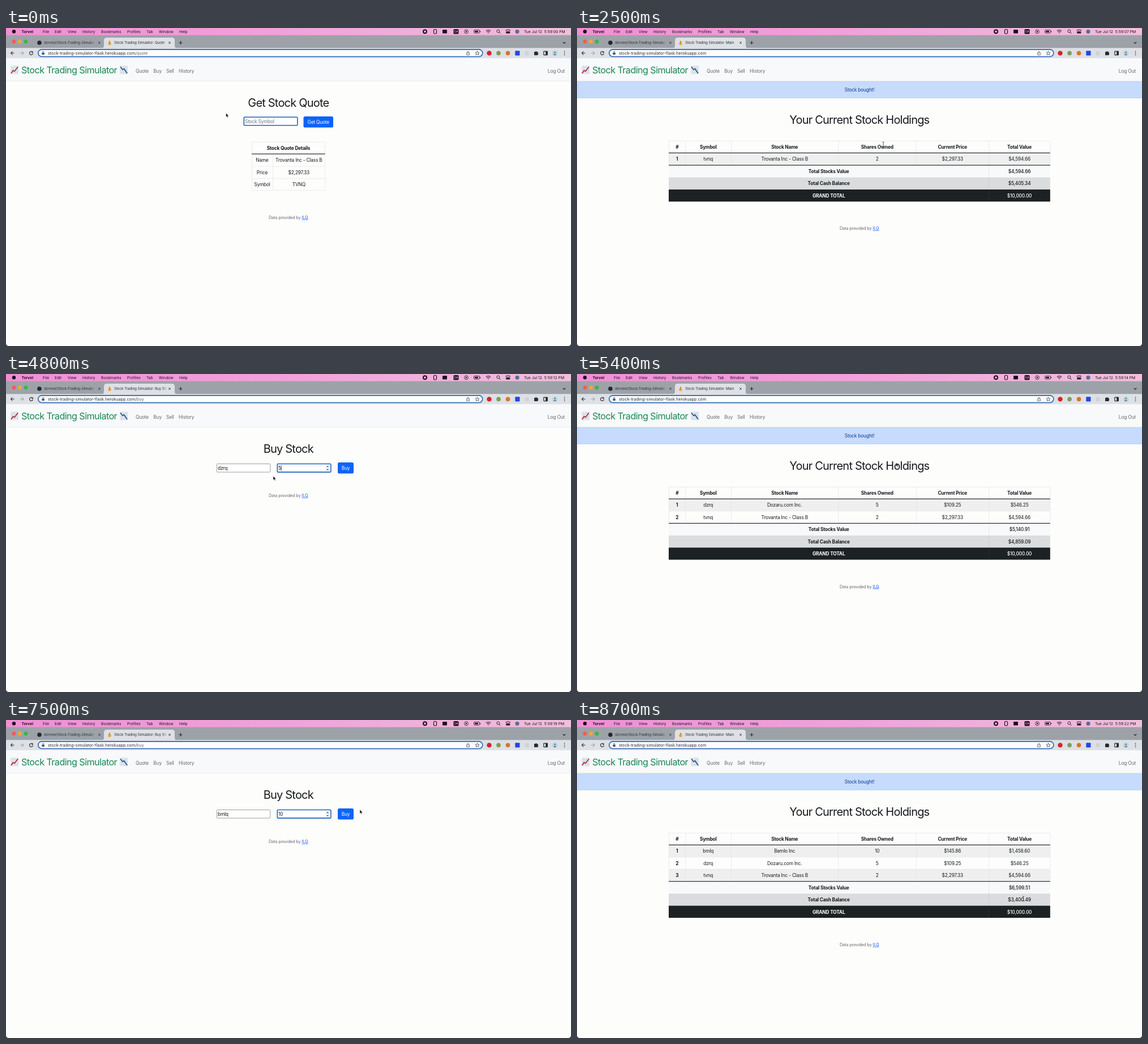
An HTML page with a canvas for the animation above (8800 ms loop, 998 by 561 pixels).

```html
<!DOCTYPE html>
<html lang="en">
<head>
<meta charset="utf-8">
<title>Stock Trading Simulator</title>
<style>
  html, body { margin: 0; width: 100%; height: 100%; overflow: hidden; background: #fdfdfc; }
  canvas { display: block; width: 998px; height: 561px; }
</style>
</head>
<body>
<canvas id="stage" width="998" height="561"></canvas>
<script>
const ctx = document.getElementById('stage').getContext('2d');
const LOOP = 8800, STEP = 100;
const INK = '#16191c', LINE = '#dee2e6', BLUE = '#0d63fa', GREY = '#66696c';
const HOST = 'stock-trading-simulator-flask.herokuapp.com';

const STOCKS = {
  tvnq: { name: 'Trovanta Inc - Class B', shares: 2, price: 2297.33 },
  dzrq: { name: 'Dozaru.com Inc.', shares: 5, price: 109.25 },
  bmlq: { name: 'Bemlo Inc', shares: 10, price: 145.86 }
};

// hover and click: when the Buy link is pointed at and pressed
const SCENES = [
  { at: 0, page: 'quote', hover: 400, click: 600 },
  { at: 700, page: 'buy', symbol: 'tvnq', symbolAt: 900, sharesAt: 1500 },
  { at: 2200, page: 'main', held: ['tvnq'] },
  { at: 3200, page: 'buy', symbol: 'dzrq', symbolAt: 3700, sharesAt: 4500 },
  { at: 5300, page: 'main', held: ['dzrq', 'tvnq'], hover: 5900, click: 6000 },
  { at: 6200, page: 'buy', symbol: 'bmlq', symbolAt: 6500, sharesAt: 7100 },
  { at: 8200, page: 'main', held: ['bmlq', 'dzrq', 'tvnq'] }
];

// time, x, y, pointer shape from that time on
const POINTER = [
  [0, 388.5, 150, 'arrow'], [200, 350, 125, 'arrow'], [400, 264, 78, 'hand'],
  [900, 264, 78, 'none'], [1700, 470, 190, 'arrow'], [1900, 598, 165, 'hand'],
  [2200, 598, 168, 'arrow'], [2400, 541, 205, 'text'], [2600, 541, 205, 'arrow'],
  [3000, 264, 78, 'hand'], [3300, 264, 78, 'arrow'], [3500, 420, 166, 'text'],
  [3700, 420, 166, 'none'], [4600, 440, 190, 'arrow'], [4800, 472, 180, 'arrow'],
  [5000, 598, 165, 'hand'], [5300, 598, 165, 'arrow'], [5800, 264, 78, 'hand'],
  [6300, 264, 78, 'arrow'], [6500, 400, 185, 'none'], [7100, 650, 197, 'arrow'],
  [7500, 625, 158, 'arrow'], [7700, 600, 165, 'hand'], [8000, 640, 205, 'arrow'],
  [8300, 730, 285, 'text'], [8600, 788.5, 315, 'text']
];

function text(str, x, y, { size = 8.3, color = INK, weight = 400, align = 'left', track = -0.02 } = {}) {
  ctx.font = `${weight} ${size}px Inter, sans-serif`;
  ctx.letterSpacing = `${track * size}px`;
  ctx.textAlign = align;
  ctx.fillStyle = color;
  ctx.fillText(str, x, y);
}
const centered = (str, x, y, style) => text(str, x, y, { ...style, align: 'center' });

function rect(x, y, w, h, color) {
  ctx.fillStyle = color;
  ctx.fillRect(x, y, w, h);
}

function round(x, y, w, h, r, fill, stroke, width = 1) {
  ctx.beginPath();
  ctx.roundRect(x, y, w, h, r);
  paint(fill, stroke, width);
}

function paint(fill, stroke, width = 1) {
  if (fill) { ctx.fillStyle = fill; ctx.fill(); }
  if (stroke) { ctx.strokeStyle = stroke; ctx.lineWidth = width; ctx.stroke(); }
}

function circle(x, y, r, fill, stroke, width) {
  ctx.beginPath();
  ctx.arc(x, y, r, 0, 7);
  paint(fill, stroke, width);
}

function path(d, x, y, fill, stroke, width) {
  const shape = new Path2D(d);
  ctx.save();
  ctx.translate(x, y);
  if (fill) { ctx.fillStyle = fill; ctx.fill(shape); }
  if (stroke) { ctx.strokeStyle = stroke; ctx.lineWidth = width || 1; ctx.stroke(shape); }
  ctx.restore();
}

function fadedText(str, x, y, right, style) {
  const fade = ctx.createLinearGradient(right - 8, 0, right, 0);
  fade.addColorStop(0, style.color);
  fade.addColorStop(1, style.color + '00');
  ctx.save();
  ctx.beginPath();
  ctx.rect(x, y - 10, right - x, 14);
  ctx.clip();
  text(str, x, y, { ...style, color: fade });
  ctx.restore();
}

function menuBar(t) {
  const pink = ctx.createLinearGradient(0, 0, 998, 0);
  pink.addColorStop(0, '#ef8fd4');
  pink.addColorStop(0.5, '#f0a2dc');
  pink.addColorStop(1, '#f0bfdb');
  rect(0, 0, 998, 13, pink);
  circle(14, 6.3, 3.2, '#1b111b');
  const style = { size: 6.7, color: '#1b111b', track: 0 };
  text('Torvel', 27.5, 8.5, { ...style, weight: 700 });
  [['File', 65], ['Edit', 86], ['View', 109], ['History', 135], ['Bookmarks', 168], ['Profiles', 214],
   ['Tab', 248], ['Window', 270], ['Help', 306]].forEach(([label, x]) => text(label, x, 8.5, style));

  circle(740, 6.3, 4, '#1b111b');
  round(738.3, 4.6, 3.4, 3.4, 0.6, '#f0b0e2');
  round(755.5, 2.5, 5, 7.5, 1.5, null, '#1b111b', 1.2);
  round(771, 3, 8, 6.5, 1, '#1b111b');
  round(790.5, 2, 9, 8.5, 1.5, '#1b111b');
  centered('CA', 795, 8.4, { size: 5, color: '#f0b0e2', weight: 600 });
  circle(813, 6.3, 3.4, null, '#1b111b', 0.8);
  path('M-1-1.8 2 0-1 1.8Z', 813, 6.3, '#1b111b');
  round(826.5, 3.5, 10, 5.5, 1.5, null, '#1b111b', 0.8);
  rect(828, 5, 6, 2.5, '#1b111b');
  rect(837.2, 5.3, 1, 2, '#1b111b');
  path('M-4-2Q0-5 4-2M-2.5 0Q0-2 2.5 0M-.8 1.8h1.6', 852, 7, null, '#1b111b', 1.1);
  circle(869.3, 5.5, 2.5, null, '#1b111b', 0.9);
  path('M0 0 2.2 2.4', 871.2, 7.5, null, '#1b111b', 1);
  round(883, 3, 7.5, 2.8, 1.4, null, '#1b111b', 0.9);
  round(883, 6.8, 7.5, 2.8, 1.4, '#1b111b');
  circle(903, 6.3, 3.6, '#5a6f96');

  const second = Math.floor(t / 1000 * 2.5 + 0.85);
  text(`Tue Jul 12  5:59:${String(second).padStart(2, '0')} PM`, 915, 8.5, { ...style, size: 6.75 });
}

function cross(x, y, r = 1.8, width = 0.9) {
  path(`M${-r} ${-r} ${r} ${r}M${r} ${-r} ${-r} ${r}`, x, y, null, '#33373b', width);
}

function browser(scene, loading) {
  rect(0, 12.6, 998, 23, '#9da2a9');
  [['#f25c54', 14], ['#f0a83a', 24.5], ['#38b54a', 35]].forEach(([color, x]) => circle(x, 24, 3.4, color));
  circle(59, 26, 3.8, '#24292f');
  const tab = { size: 6.35, color: '#2d3136' };
  fadedText('dorvexi/Stock-Trading-Simulator', 67, 28.3, 157, tab);
  cross(165, 26);
  path('M168 36Q173 36 173 31V22Q173 17 178 17H293Q298 17 298 22V31Q298 36 303 36Z', 0, 0, '#dde0e4');
  if (!loading) {
    circle(183, 27.4, 2.7, '#e9a23b');
    rect(182, 22.8, 2, 3, '#c9822c');
  }
  const title = { quote: 'Quote', buy: 'Buy Stock', main: 'Main' }[scene.page];
  fadedText(`Stock Trading Simulator: ${title}`, 191, 28.3, 285, tab);
  cross(289, 26);
  path('M-3 0H3M0-3V3', 308.5, 26, null, '#22262a', 1.1);
  path('M-2.2-1 0 1.2 2.2-1', 986, 26, null, '#22262a', 1.1);

  rect(0, 35.5, 998, 18, '#dde0e4');
  path('M3.2 0H-3M0-3-3 0 0 3', 11.5, 44.3, null, '#30343a', 1.1);
  path('M-3.2 0H3M0-3 3 0 0 3', 28, 44.3, null, '#a2a7ad', 1.1);
  if (loading) cross(44.5, 44.3, 2.7, 1.2);
  else {
    path('M2.3-1.9A3 3 0 1 0 3 .6', 44.5, 44.3, null, '#30343a', 1.2);
    path('M3.3-3.6V-.5H.2Z', 44.5, 44.3, '#30343a');
  }
  round(56.8, 37.9, 785, 12.6, 6.3, '#fdfdfd', '#2b63b8', 1.6);
  round(63.4, 43.4, 4.4, 3.6, 0.5, '#4a4e53');
  path('M-1.2 0V-1.3A1.2 1.2 0 0 1 1.2-1.3V0', 65.6, 43.6, null, '#4a4e53', 0.8);
  const slug = scene.page === 'main' ? '' : '/' + scene.page;
  const url = { size: 7.2, color: '#25282c', track: 0 };
  text(HOST, 74, 46.8, url);
  text(slug, 74 + ctx.measureText(HOST).width, 46.8, { ...url, color: '#5d6268' });
  path('M-1-1H-2.4V3H2.4V-1H1M0 1V-3.4M-1.3-2.2 0-3.5 1.3-2.2', 816, 44.5, null, '#50555b', 0.8);
  path('M0-3.7 1-1.2 3.6-1 1.6.7 2.3 3.2 0 1.8-2.3 3.2-1.6.7-3.6-1-1-1.2Z', 832.5, 44.4, null, '#43474c', 0.8);

  circle(853.5, 44.4, 4.2, '#d6232b');
  circle(870, 44.4, 3.8, '#7e9e54');
  circle(886.5, 44.4, 3.8, '#d9742d');
  round(899.3, 40.3, 8.2, 8.2, 1, '#2547e0');
  round(916.5, 41, 7, 7, 1, '#cfd3d7');
  path('M-3.5-2H-1.5A1.3 1.3 0 0 1 1-2H3V0A1.3 1.3 0 0 1 3 2.4V4H-3.5Z', 936.5, 44, '#272a2e');
  round(949.8, 41.2, 6.6, 6.4, 0.5, null, '#272a2e', 1.2);
  rect(953.2, 41, 3.3, 7, '#272a2e');
  circle(969.5, 44.4, 4.8, '#b7d7e4');
  circle(969.5, 43, 1.6, '#6b87a4');
  path('M-2.8 3.6Q0-2 2.8 3.6Z', 969.5, 44.4, '#6b87a4');
  [-3, 0, 3].forEach(dy => circle(986.5, 44.4 + dy, 0.8, '#33373b'));
}

function chartIcon(x, color, line) {
  rect(x, 66.5, 14, 15, '#e4eaee');
  for (let i = 3; i < 14; i += 3) {
    rect(x + i, 66.5, 0.5, 15, '#c2ced6');
    rect(x, 66.5 + i, 14, 0.5, '#c2ced6');
  }
  path(line, x, 66.5, null, color, 1.7);
}

function navBar(hovering) {
  rect(0, 53.5, 998, 40.5, '#f8f9fa');
  rect(0, 93.4, 998, 0.7, '#e6e8ea');
  chartIcon(8, '#b3263b', 'M1 13.5 4.5 8.5 7 10 13 2');
  chartIcon(201, '#244f93', 'M1 2 5 7 7.5 5.5 13 13.5');
  text('Stock Trading Simulator', 27, 80, { size: 16.2, color: '#198754', track: -0.036 });
  [['Quote', 229], ['Buy', 260.3], ['Sell', 283], ['History', 305]].forEach(([label, x]) =>
    text(label, x, 79, { size: 8.4, color: label === 'Buy' && hovering ? '#393b3d' : GREY }));
  text('Log Out', 987, 79, { size: 8.4, color: GREY, align: 'right' });
}

const heading = (str, y) => centered(str, 498.8, y, { size: 20, track: -0.04 });

function footer(y) {
  text('Data provided by ', 464, y, { size: 7.3, color: GREY });
  const x = 464 + ctx.measureText('Data provided by ').width;
  text('ILQ', x, y, { size: 7.3, color: BLUE });
  rect(x, y + 1, ctx.measureText('ILQ').width, 0.7, BLUE);
}

function button(label, x, w) {
  round(x, 156, w, 19.5, 2.6, BLUE);
  centered(label, x + w / 2, 169, { color: '#fff' });
}

function field(x, y, value, placeholder, focused, caret) {
  round(x + 0.3, y + 0.2, 94.5, 14.6, 1.2, '#fff', focused ? '#1f63bd' : '#85888a', focused ? 1.6 : 0.8);
  const shown = value || (caret ? '' : placeholder);
  text(value || placeholder, x + 2, y + 10.6, { color: value ? '#111' : '#6f7173' });
  if (caret) rect(x + 2 + (shown ? ctx.measureText(shown).width : 0), y + 3, 0.8, 9.5, '#111');
}

function grid(xs, ys, color) {
  xs.forEach(x => rect(x, ys[0], 0.6, ys[ys.length - 1] - ys[0], color));
  ys.forEach(y => rect(xs[0], y, xs[xs.length - 1] - xs[0], 0.6, color));
}

const money = n => '$' + n.toLocaleString('en-US', { minimumFractionDigits: 2, maximumFractionDigits: 2 });

function quotePage() {
  heading('Get Stock Quote', 138.5);
  field(420, 157, '', 'Stock Symbol', true, false);
  button('Get Quote', 525.5, 52.5);
  grid([434, 563.3], [200.7, 222, 243.8, 265, 286.3], LINE);
  rect(471, 222, 0.6, 64.3, LINE);
  rect(434, 221.6, 129.6, 1.1, INK);
  centered('Stock Quote Details', 499, 214.5, { weight: 700 });
  [['Name', STOCKS.tvnq.name], ['Price', money(STOCKS.tvnq.price)], ['Symbol', 'TVNQ']].forEach(([label, value], i) => {
    centered(label, 452.5, 236.3 + i * 21.3);
    centered(value, 517.3, 236.3 + i * 21.3);
  });
  footer(336.8);
}

function buyPage(scene, t) {
  const typed = (str, start) => str.slice(0, Math.max(0, Math.floor((t - start) / 100) + 1));
  const shares = typed(String(STOCKS[scene.symbol].shares), scene.sharesAt);
  const symbol = typed(scene.symbol, scene.symbolAt);
  const onShares = t >= scene.sharesAt - 100;
  const caret = t % 400 < 300;
  heading('Buy Stock', 138.5);
  field(372, 158.3, symbol, 'Stock Symbol', !onShares, !onShares && caret);
  field(479, 158.3, shares, 'How Many Shares', onShares, onShares && caret);
  if (onShares) {
    round(564.5, 160.3, 7, 11, 1, '#eceef0');
    path('M-1.7-2 0-4 1.7-2ZM-1.7 2 0 4 1.7 2Z', 568, 165.9, '#3a3d40');
  }
  button('Buy', 586, 28);
  footer(217.2);
}

function mainPage(scene) {
  const cols = [162, 191.5, 272, 461.5, 599, 727.5, 835.6];
  const rowH = 21.35, width = 673.8;
  const count = scene.held.length;
  const middle = i => (cols[i] + cols[i + 1]) / 2;
  // the heavy rule below the stocks pushes the totals down a little
  const rowY = i => 199 + i * rowH + (i > count ? 0.5 : 0);
  const bold = { weight: 700 };

  rect(0, 94, 998, 30, '#c6dbfd');
  rect(0, 94, 998, 0.7, '#b2d0fc');
  rect(0, 123.3, 998, 0.7, '#b2d0fc');
  centered('Stock bought!', 499, 111.6, { color: '#083a8c' });
  heading('Your Current Stock Holdings', 168.5);

  ['#', 'Symbol', 'Stock Name', 'Shares Owned', 'Current Price', 'Total Value'].forEach((label, i) =>
    centered(label, middle(i), 212.5, bold));
  let total = 0;
  scene.held.forEach((symbol, n) => {
    const { name, shares, price } = STOCKS[symbol];
    const y = rowY(n + 1);
    total += shares * price;
    if (n % 2 === 0) rect(162, y, width, rowH, '#efefef');
    [n + 1, symbol, name, shares, money(price), money(shares * price)].forEach((value, i) =>
      centered(value, middle(i), y + 13.9, i ? {} : bold));
  });
  grid(cols, Array.from({ length: count + 2 }, (_, i) => rowY(i)), LINE);

  const sums = [
    ['Total Stocks Value', total, '#f8f9fa', INK, '#dfe0e1'],
    ['Total Cash Balance', 10000 - total, '#dadcdd', INK, '#c6c9cc'],
    ['GRAND TOTAL', 10000, '#1c2123', '#fff', '#373b3e']
  ];
  sums.forEach(([label, value, fill, color, line], i) => {
    const y = rowY(count + 1 + i);
    rect(162, y, width, rowH, fill);
    rect(cols[5], y, 0.6, rowH, line);
    centered(label, 444.7, y + 13.9, { color, weight: 700 });
    centered(money(value), middle(5), y + 13.9, { color, weight: 500 });
  });
  rect(162, rowY(1) - 0.5, width, 1.1, INK);
  rect(162, rowY(count + 1) - 0.7, width, 1.1, INK);
  footer(rowY(count + 4) + 50);
}

function statusBar() {
  path('M0 550.5H171Q174 550.5 174 553.5V561H0Z', 0, 0, '#cfd3d8');
  text(`https://${HOST}/buy`, 2.5, 557.8, { size: 6.4, color: '#a0a5ab', track: 0 });
}

function pointer(t) {
  const i = POINTER.findLastIndex(key => key[0] <= t);
  const [t0, x0, y0, shape] = POINTER[i];
  const [t1, x1, y1] = POINTER[i + 1] || [LOOP, x0, y0];
  const k = (t - t0) / (t1 - t0), ease = k * k * (3 - 2 * k);
  const x = x0 + (x1 - x0) * ease, y = y0 + (y1 - y0) * ease;
  if (shape === 'arrow') path('M0 0V7.2L1.7 5.7 2.9 8.3 4 7.8 2.9 5.3H5Z', x, y, '#111', '#fff', 0.5);
  if (shape === 'text') path('M-1.5-4Q0-4 0-3Q0-4 1.5-4M0-3V3M-1.5 4Q0 4 0 3Q0 4 1.5 4', x, y, null, '#333', 0.8);
  if (shape === 'hand')
    path('M-.8-.5Q0-1.5.8-.5V3Q2 2.3 2.3 3.3Q3.5 2.8 3.7 3.9Q4.8 3.6 4.8 5L4 8.4H-.4L-2.8 5Q-2.4 3.9-.8 5Z',
      x, y, '#fff', '#111', 0.9);
}

function draw(t) {
  const scene = SCENES.findLast(s => s.at <= t);
  const hovering = t >= scene.hover;
  rect(0, 0, 998, 561, '#fdfdfc');
  menuBar(t);
  browser(scene, t >= scene.click);
  navBar(hovering);
  if (scene.page === 'quote') quotePage();
  if (scene.page === 'buy') buyPage(scene, t);
  if (scene.page === 'main') mainPage(scene);
  if (hovering) statusBar();
  path('M0 556Q0 561 5 561H0ZM998 556Q998 561 993 561H998Z', 0, 0, '#241a33');
  pointer(t);
}

const start = performance.now();
function tick() {
  const elapsed = (performance.now() - start) % LOOP;
  draw(Math.floor(elapsed / STEP) * STEP);
  requestAnimationFrame(tick);
}
tick();
</script>
</body>
</html>
```
